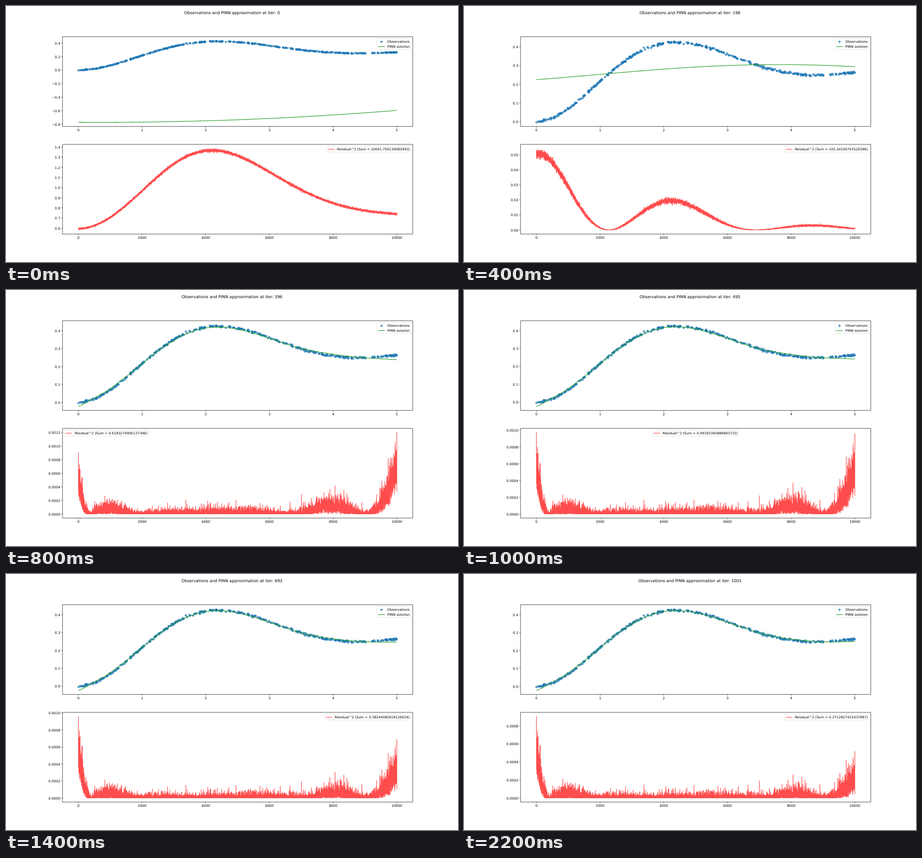
An HTML page that plays this animation: 993 by 564 pixels, repeating every 2400 ms.

```html
<!DOCTYPE html>
<html lang="en">
<head>
<meta charset="utf-8">
<title>PINN training</title>
<style>
  html, body { margin: 0; width: 100%; height: 100%; overflow: hidden; background: #fff; }
  svg { display: block; width: 993px; height: 564px; }
  text { font-family: "DejaVu Sans", sans-serif; text-rendering: geometricPrecision; fill: #000; }
</style>
</head>
<body>
<svg id="stage" viewBox="0 0 993 564"></svg>
<script>
const start = performance.now();
const W = 993, H = 564.5, STEP = 200, COUNT = 10000;
const FONT = 7.4, EM = 7.18, PT = EM / 10, LINE = 1.8 * PT;
const LEFT = W * 0.125, RIGHT = W * 0.9, AXES_H = H * 0.35;
const TOP1 = H * 0.12, TOP2 = TOP1 + AXES_H * 1.2;
const SPAN = (RIGHT - LEFT) / 1.1, X0 = LEFT + SPAN / 20;
const BLUE = '#1f77b4', GREEN = '#2ca02c', RED = '#ff0000';
const SIGMA = 0.0031, PEAK = 0.0077, FLOOR = -0.0041, CEIL = 0.4329;

// Seeded noise
let seed = 20231;
function rand() {
  seed = (seed + 0x6D2B79F5) | 0;
  let t = Math.imul(seed ^ (seed >>> 15), 1 | seed);
  t = (t + Math.imul(t ^ (t >>> 7), 61 | t)) ^ t;
  return ((t ^ (t >>> 14)) >>> 0) / 4294967296;
}
const gauss = () => Math.sqrt(-2 * Math.log(1 - rand())) * Math.cos(2 * Math.PI * rand());
const clamp = (v, lo, hi) => Math.max(lo, Math.min(hi, v));
const list = (n, make) => Array.from({ length: n }, (_, i) => make(i));

const times = list(COUNT, i => i * 5 / COUNT);
const noise = times.map(() => gauss() * SIGMA);
noise[0] = noise[COUNT - 1] = PEAK;

// Damped step response
function truth(t) {
  const s = 0.4, w = 1.43;
  return 0.3 * (1 - Math.exp(-s * t) * (Math.cos(w * t) + s / w * Math.sin(w * t)));
}

const dots = list(420, () => {
  const i = Math.floor(rand() * COUNT);
  return [times[i], clamp(truth(times[i]) + noise[i], FLOOR, CEIL)];
});

// Smooth curve through [t, v] knots
function spline(knots) {
  const last = knots.length - 1;
  const slope = (a, b) => (knots[b][1] - knots[a][1]) / (knots[b][0] - knots[a][0]);
  const tan = knots.map((k, i) => {
    if (i === 0) return slope(0, 1);
    if (i === last) return slope(last - 1, last);
    const h0 = k[0] - knots[i - 1][0], h1 = knots[i + 1][0] - k[0];
    return (slope(i - 1, i) * h1 + slope(i, i + 1) * h0) / (h0 + h1);
  });
  return t => {
    let i = 0;
    while (i < last - 1 && t > knots[i + 1][0]) i++;
    const [a, p] = knots[i], [b, q] = knots[i + 1];
    const h = b - a, u = (t - a) / h, u2 = u * u, u3 = u2 * u;
    return p * (2 * u3 - 3 * u2 + 1) + q * (3 * u2 - 2 * u3) +
      h * (tan[i] * (u3 - 2 * u2 + u) + tan[i + 1] * (u3 - u2));
  };
}

// Nearly fitted: the error swings around zero and fades with k
function refined(k) {
  const fast = Math.exp(-k), slow = Math.exp(-0.3 * k);
  const head = 0.0245 - 0.0079 * fast ** 1.5 - 0.0003 * k;
  const tail = 0.0128 + 0.0192 * slow;
  const error = spline([
    [0, head], [0.2 - 0.07 * fast, 0], [0.5, -0.0055 - 0.005 * fast], [0.97, 0],
    [1.9, 0.0015 + 0.007 * fast], [3.5 - 0.5 * fast, 0],
    [4.05 - 0.2 * fast, -0.005 - 0.0075 * slow], [4.5, 0], [4.77, 0.47 * tail], [5, tail]
  ]);
  return t => truth(t) - error(t);
}

const early = [
  t => -0.771 - 0.0053 * t + 0.0081 * t * t,
  t => 0.268 + 0.022 * Math.sin(0.52 * t),
  t => 0.2515 + 0.054 * Math.cos(0.55 * (t - 3.8))
];
const sums = `10041.750134083493 124.70318265947296 105.34104743520396 1.1717299940171935
  0.6183274905127346 0.49193345886683715 0.43260718594420683 0.38244082819126024
  0.34057192648301756 0.30431206720658827 0.2744190635281947 0.2712827422437887`.split(/\s+/);

const pen = document.createElement('canvas').getContext('2d');
function textWidth(s) {
  pen.font = '100px "DejaVu Sans", sans-serif';
  return pen.measureText(s).width * FONT / 100;
}

const text = (s, x, y, anchor = 'start', size = FONT) =>
  `<text x="${x.toFixed(2)}" y="${y.toFixed(2)}" font-size="${size}" text-anchor="${anchor}">${s}</text>`;
const stroke = (d, color, width) =>
  `<path d="${d}" fill="none" stroke="${color}" stroke-width="${width}" stroke-linejoin="round" ` +
  `stroke-opacity="${color === RED ? 0.7 : 1}"/>`;
const polyline = pts => 'M' + pts.map(p => p[0].toFixed(2) + ' ' + p[1].toFixed(2)).join('L');
const dot = (x, y) => `<circle cx="${x.toFixed(2)}" cy="${y.toFixed(2)}" r="${3 * PT}"/>`;
const dotGroup = s => `<g fill="${BLUE}" stroke="${BLUE}" fill-opacity=".7" stroke-opacity=".7" ` +
  `stroke-width="${PT}">${s}</g>`;

const xAt = t => X0 + SPAN * t / 5;
const yScale = (top, lo, hi) => v => top + AXES_H * (1 / 22 + (hi - v) / (hi - lo) / 1.1);

// Smallest round step that gives at most nine intervals
function niceStep(range) {
  const base = 10 ** Math.floor(Math.log10(range / 9));
  return base * [1, 2, 5, 10].find(m => range / (base * m) <= 9.2);
}

function axes(top, lo, hi, step, xMax, xStep) {
  const y = yScale(top, lo, hi), bottom = top + AXES_H, pad = (hi - lo) / 20;
  const tick = 3.5 * PT, digits = Math.ceil(-Math.log10(step) - 1e-9);
  let d = `M${LEFT} ${top}H${RIGHT}V${bottom}H${LEFT}Z`, labels = '';
  for (let v = 0; v <= xMax; v += xStep) {
    const x = X0 + SPAN * v / xMax;
    d += `M${x} ${bottom}v${tick}`;
    labels += text(v, x, bottom + 2 * tick + 0.79 * FONT, 'middle');
  }
  for (let k = Math.ceil((lo - pad) / step); k * step <= hi + pad; k++) {
    const v = k * step;
    d += `M${LEFT} ${y(v)}h${-tick}`;
    labels += text(v.toFixed(digits).replace('-', '−'), LEFT - 2 * tick, y(v) + 0.42 * FONT, 'end');
  }
  return stroke(d, '#000', 0.75) + labels;
}

// The legend takes the first place that the points leave free
function legend(top, rows, points = []) {
  const textX = 3.2 * EM, inset = EM / 2, rowH = 10.9;
  const width = textX + Math.max(...rows.map(r => textWidth(r[0]))) + 0.4 * EM;
  const y = top + inset, height = 13.2 + rowH * (rows.length - 1);
  const places = [RIGHT - inset - width, LEFT + inset, (LEFT + RIGHT - width) / 2];
  const x = places.find(px => !points.some(p => p[0] > px && p[0] < px + width && p[1] < y + height));
  let out = `<rect x="${x}" y="${y}" width="${width}" height="${height}" rx="1.4" fill="#fff" ` +
    `fill-opacity=".8" stroke="#ccc" stroke-opacity=".8" stroke-width="${PT}"/>`;
  rows.forEach(([label, color], i) => {
    const mid = Math.floor(y + 7.1 + rowH * i) + 0.5, hx = x + 0.4 * EM;
    out += color === BLUE ? dotGroup(dot(hx + EM, mid + 0.3)) : stroke(`M${hx} ${mid}h${2 * EM}`, color, LINE);
    out += text(label, x + textX, mid + 0.36 * FONT);
  });
  return out;
}

function draw(sum, i) {
  const iter = Math.min(99 * i, 1001);
  const model = early[i] || refined(iter / 99 - 3);
  const curve = list(251, n => [n / 50, model(n / 50)]);
  const lo = Math.min(FLOOR, ...curve.map(p => p[1]));
  const y1 = yScale(TOP1, lo, CEIL);

  const errors = times.map(t => truth(t) - model(t)), sizes = errors.map(Math.abs);
  const rLo = Math.max(0, Math.min(...sizes) - PEAK) ** 2;
  const rHi = (Math.max(...sizes) + PEAK) ** 2;
  const y2 = yScale(TOP2, rLo, rHi);
  const residual = errors.map((e, n) => {
    const r = (e + noise[n]) ** 2;
    return [xAt(times[n]), y2(r > rHi + 1e-9 || r < rLo ? (e - noise[n]) ** 2 : r)];
  });

  return text(`Observations and PINN approximation at iter: ${iter}`, W / 2, 18.1, 'middle', FONT * 1.2) +
    dotGroup(dots.map(([t, v]) => dot(xAt(t), y1(v))).join('')) +
    stroke(polyline(curve.map(([t, v]) => [xAt(t), y1(v)])), GREEN, LINE) +
    axes(TOP1, lo, CEIL, lo < -0.3 ? 0.2 : 0.1, 5, 1) +
    legend(TOP1, [['Observations', BLUE], ['PINN solution', GREEN]]) +
    stroke(polyline(residual), RED, LINE) +
    axes(TOP2, rLo, rHi, niceStep((rHi - rLo) * 1.1), COUNT, 2000) +
    legend(TOP2, [[`Residual^2 (Sum = ${sum})`, RED]], residual);
}

const stage = document.getElementById('stage');
const scenes = sums.map(draw);
let shown = -1;
function play() {
  const i = Math.floor((performance.now() - start) / STEP) % scenes.length;
  if (i !== shown) stage.innerHTML = scenes[shown = i];
  requestAnimationFrame(play);
}
play();
</script>
</body>
</html>
```
